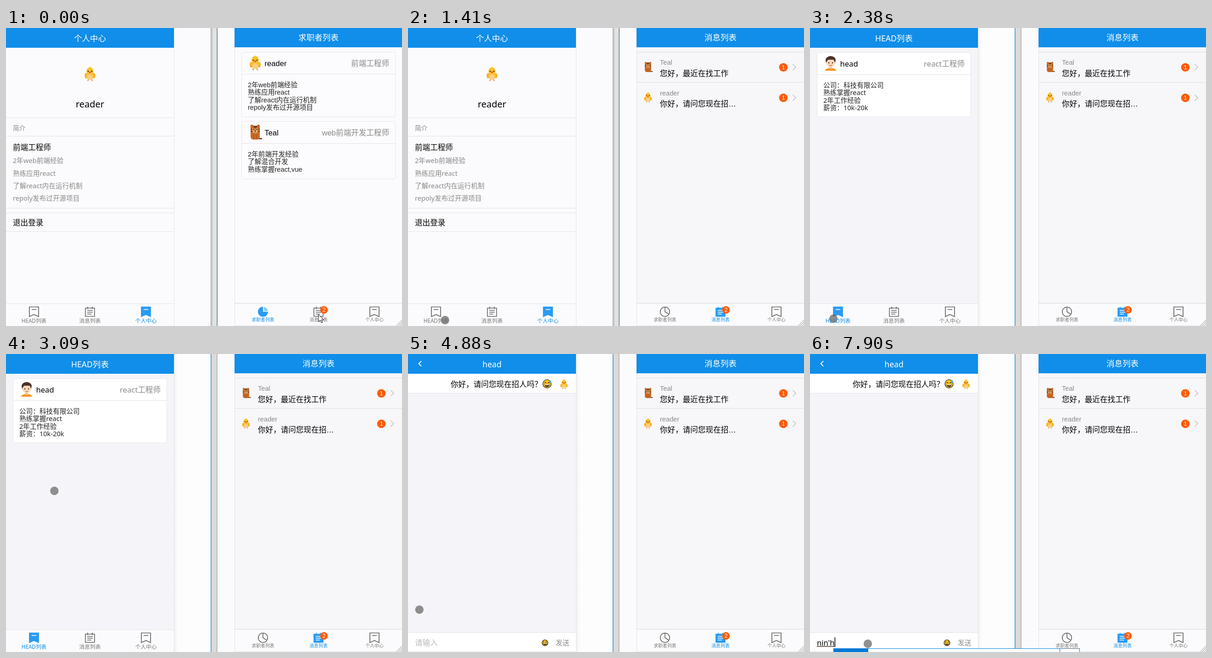
These frames come from a looping animation (863 px wide and 649 px high, 8 s). An HTML page with a canvas:

```html
<!DOCTYPE html>
<html lang="zh-CN">
<head>
<meta charset="utf-8">
<title>消息列表</title>
<style>
html, body { margin: 0; width: 100%; height: 100%; overflow: hidden; }
canvas { display: block; }
</style>
</head>
<body>
<canvas id="stage" width="863" height="649"></canvas>
<script>
const c = document.getElementById('stage').getContext('2d');
const LOOP = 8000;
const BLUE = '#108ee9', ICON_BLUE = '#2a9bf3', GREY = '#888', LINE = '#e2e2e4', PALE = '#fbfbfd';
const CJK = '"Noto Sans CJK SC", "Noto Sans CJK", sans-serif';
const UI = '"Noto Sans", ' + CJK, ARIAL = '"Liberation Sans", ' + CJK;
const SMALL = 11.7, BODY = 14.64, LARGE = 16.6, TITLE = 17.57;

// Cursor path: time, x, y
const PATH = [
  [830, 681, 624], [960, 600, 630], [1080, 470, 628], [1200, 340, 620], [1320, 130, 620],
  [1410, 81, 636], [1520, 49, 634], [1640, 46, 632], [1940, 51, 633], [2810, 51, 633],
  [2900, 53, 580], [3060, 95, 340], [3200, 142, 150], [3290, 151, 112], [4590, 151, 112],
  [4740, 105, 310], [4900, 14, 590], [5000, 50, 632], [5120, 127, 632], [5330, 130, 634],
  [5400, 136, 639], [5470, 126, 631]
];
const PRESSES = [[1940, 2130], [4100, 4340], [5620, 5770]];
// Typed text: time, letters, right edge of the candidate bar, highlight width
const TYPING = [[7260, 'n', 481, 48], [7410, 'ni', 481, 48], [7560, 'nin', 481, 48], [7900, "nin'h", 545, 76]];

function box(color, x, y, w, h) {
  c.fillStyle = color;
  c.fillRect(x, y, w, h);
}

function oval(color, x, y, rx, ry = rx, from = 0, to = Math.PI * 2) {
  c.fillStyle = color;
  c.beginPath();
  c.ellipse(x, y, rx, ry, 0, from, to);
  c.fill();
}

function trace(points, close) {
  c.beginPath();
  points.forEach(([x, y]) => c.lineTo(x, y));
  if (close) c.closePath();
}

function stroke(color, width, points, close) {
  trace(points, close);
  c.strokeStyle = color;
  c.lineWidth = width;
  c.stroke();
}

function fill(color, points) {
  trace(points, true);
  c.fillStyle = color;
  c.fill();
}

function text(str, x, cy, size, color = '#000', font = UI, align = 'left') {
  c.font = size + 'px ' + font;
  c.textAlign = align;
  c.fillStyle = color;
  c.fillText(str, x, cy + size * 0.37);
}

function lines(list, x, y, step, color, font) {
  list.forEach((s, i) => text(s, x, y + i * step, BODY, color, font));
}

// Draws in a 24 x 32 space centred on x, y
function figure(x, y, height, paint) {
  c.save();
  c.translate(x, y);
  c.scale(height / 32, height / 32);
  paint();
  c.restore();
}

function chick() {
  stroke('#e9862c', 1.6, [[-4, 11], [-4, 15], [-6, 15]]);
  stroke('#e9862c', 1.6, [[4, 11], [4, 15], [6, 15]]);
  oval('#f7ab23', -9, 4, 3, 6);
  oval('#f7ab23', 9, 4, 3, 6);
  oval('#fdbf2d', 0, 4, 9, 9);
  oval('#fdbf2d', 0, -6, 8, 8.5);
  stroke('#fdbf2d', 2, [[-2, -15], [0, -12], [2, -16]]);
  oval('#f9cf86', 0, 7, 6, 6);
  oval('#3c2c25', -4, -6, 1.2, 1.6);
  oval('#3c2c25', 4, -6, 1.2, 1.6);
  fill('#e85d2a', [[-3, -4], [0, -6], [3, -4], [0, -1]]);
}

function tiger() {
  stroke('#553423', 2.6, [[3, 14], [15, 14]]);
  oval('#cb6925', -7, -13, 3.5);
  oval('#cb6925', 7, -13, 3.5);
  c.fillStyle = '#cb6925';
  c.beginPath();
  c.roundRect(-10, -14, 20, 30, 6);
  c.fill();
  stroke('#44271d', 1.7, [[-4, -13], [4, -13]]);
  stroke('#44271d', 1.5, [[-3, -10.5], [3, -10.5]]);
  for (const s of [-1, 1]) {
    stroke('#44271d', 1.6, [[s * 10, -7], [s * 6.5, -6]]);
    stroke('#44271d', 1.6, [[s * 10, -2], [s * 7, -2]]);
    oval('#f3bb72', s * 4, -6, 2.6);
    oval('#2b1b17', s * 4, -6, 1.3);
    stroke('#994719', 1, [[s * 3, 5], [s * 3, 14]]);
  }
  oval('#f1c28a', 0, -1, 4.5, 3.2);
  fill('#38231c', [[-2.5, -3.5], [2.5, -3.5], [0, -1]]);
  stroke('#6b341a', 1, [[-2.5, 1], [0, 0], [2.5, 1]]);
}

function boy() {
  oval('#f7941d', 0, 16, 12, 6, Math.PI, Math.PI * 2);
  box('#f1bc98', -3, 5, 6, 7);
  oval('#fbd0ae', -9.5, -2, 2);
  oval('#fbd0ae', 9.5, -2, 2);
  oval('#4b3025', 0, -7, 11, 9);
  oval('#fdd7b8', 0, -1, 9, 9.5);
  fill('#4b3025', [[-10, -3], [-10, -9], [-4, -14], [6, -14], [10, -9], [10, -3], [7, -8], [-5, -8]]);
  oval('#36251f', -4, -1, 1.1, 1.4);
  oval('#36251f', 4, -1, 1.1, 1.4);
  stroke('#b5523f', 1.2, [[-3, 4], [0, 5], [3, 4]]);
}

function smiley(x, y, r, sweat) {
  oval('#2f2710', x, y, r);
  oval('#fcc629', x, y, r - 1.3);
  oval('#3a2514', x, y + r * 0.12, r * 0.58, r * 0.58, 0, Math.PI);
  box('#fff', x - r * 0.45, y + r * 0.15, r * 0.9, r * 0.17);
  for (const s of [-1, 1]) {
    const ex = x + s * r * 0.37, ey = y - r * 0.25;
    if (sweat) stroke('#2f2710', 1.3, [[ex - 2, ey + 1], [ex, ey - 1], [ex + 2, ey + 1]]);
    else oval('#2f2710', ex, ey, r * 0.13, r * 0.22);
  }
  if (sweat) oval('#43b5ee', x + r * 0.7, y - r * 0.5, 2, 3);
}

function bookmark(x, y, active) {
  const shape = [[x - 10, y - 10.5], [x + 10, y - 10.5], [x + 10, y + 10.5], [x, y + 6], [x - 10, y + 10.5]];
  if (active) fill(ICON_BLUE, shape);
  stroke(active ? ICON_BLUE : '#666', 1.7, shape, true);
  stroke(active ? '#fff' : '#666', 1.6, [[x - 5, y - 5], [x + 5, y - 5]]);
}

function calendar(x, y, active) {
  const color = active ? ICON_BLUE : '#666';
  const shape = [[x - 10, y - 8], [x + 10, y - 8], [x + 10, y + 10], [x - 10, y + 10]];
  if (active) fill(color, shape);
  stroke(color, 1.6, shape, true);
  for (const s of [-5, 5]) stroke(color, 1.6, [[x + s, y - 11], [x + s, y - 6]]);
  for (const dy of [-3, 1, 5]) {
    stroke(active ? '#fff' : '#666', 1.5, [[x - 6, y + dy], [x + (dy > 4 ? 3 : 6), y + dy]]);
  }
}

function pie(x, y, active) {
  if (active) {
    oval(ICON_BLUE, x, y, 11);
    box(PALE, x, y - 11, 11, 11);
    c.fillStyle = '#8ccafa';
    c.beginPath();
    c.moveTo(x + 1.5, y - 1.5);
    c.arc(x + 1.5, y - 1.5, 9, -Math.PI / 2, 0);
    c.fill();
    return;
  }
  c.strokeStyle = '#666';
  c.lineWidth = 1.6;
  c.beginPath();
  c.arc(x, y, 10.2, 0, Math.PI * 2);
  c.stroke();
  stroke('#666', 1.6, [[x, y - 10], [x, y], [x + 8, y + 5]]);
}

function badge(n, x, y, r) {
  oval('#ff5b05', x, y, r);
  text(n, x, y - 0.3, 12, '#fff', ARIAL, 'center');
}

function tabs(centers, y, labels, icons, active, size) {
  labels.forEach((label, i) => {
    icons[i](centers[i], 618, i === active);
    text(label, centers[i], y, size, i === active ? BLUE : '#777', UI, 'center');
  });
}

function card(x, y, h, paint, name, job, about, font, bg) {
  c.beginPath();
  c.roundRect(x + 0.5, y + 0.5, 335, h, 3);
  c.fillStyle = bg;
  c.fill();
  c.strokeStyle = '#e6e6e9';
  c.lineWidth = 1;
  c.stroke();
  box(LINE, x + 1, y + 48, 335, 1);
  figure(x + 30, y + 24, 32, paint);
  text(name, x + 50.5, y + 24.5, LARGE, '#000', font);
  text(job, x + 322, y + 24.5, LARGE, GREY, font, 'right');
  lines(about, x + 14, y + 71.5, 16.5, '#222', font);
}

function header(title, x, w, h, cy) {
  box(BLUE, x, 0, w, h);
  text(title, x + 183, cy, TITLE, '#fff', UI, 'center');
}

const SKILLS = ['2年web前端经验', '熟练应用react', '了解react内在运行机制', 'repoly发布过开源项目'];

function profile() {
  header('个人中心', 0, 366, 43, 22);
  figure(183, 100, 31, chick);
  text('reader', 183, 166, 20, '#000', UI, 'center');
  for (const y of [195, 235, 392, 402, 443]) box(LINE, 0, y, 366, 1);
  text('简介', 15, 218, 13.7, GREY);
  text('前端工程师', 15, 260, LARGE);
  lines(SKILLS, 15, 289, 27.2, GREY, UI);
  text('退出登录', 15, 424, LARGE);
}

function jobList() {
  box('#f5f5f9', 0, 43, 366, 558);
  header('HEAD列表', 0, 366, 43, 22);
  card(15, 53, 140, boy, 'head', 'react工程师',
    ['公司：科技有限公司', '熟练掌握react', '2年工作经验', '薪资：10k-20k'], UI, '#fff');
}

function chat(t) {
  box('#f5f5f9', 0, 43, 366, 563);
  header('head', 0, 366, 43, 22);
  stroke('#fff', 1.8, [[29, 15.5], [23.5, 21], [29, 26.5]]);
  box('#fff', 0, 43, 366, 42);
  box(LINE, 0, 85, 366, 1);
  text('你好，请问您现在招人吗？', 93, 65.5, LARGE);
  smiley(303, 65, 9.7, true);
  figure(340, 66, 21, chick);
  box('#fff', 0, 606, 366, 43);
  box(LINE, 0, 606, 366, 1);
  box(LINE, 0, 648, 366, 1);
  smiley(298.5, 629, 7, false);
  text('发送', 322, 628.5, BODY, GREY);
  const typed = TYPING.filter(k => t >= k[0]).pop();
  if (!typed) {
    text('请输入', 15, 628.5, LARGE, '#bbb');
    if (t >= 5770 && t < 6270 || t >= 6740) box('#000', 14, 617, 1.5, 21);
    return;
  }
  text(typed[1], 15, 628.5, LARGE);
  const w = c.measureText(typed[1]).width;
  box('#222', 15, 636, w, 1);
  for (let x = 15; x < 15 + w; x += 3) box('#c33', x, 637, 1.5, 1);
  box('#000', 15 + w, 617, 1.5, 21);
}

function candidates(t) {
  const typed = TYPING.filter(k => t >= k[0]).pop();
  if (!typed) return;
  const [, str, right, mark] = typed;
  c.font = LARGE + 'px ' + UI;
  const left = Math.round(12 + c.measureText(str).width);
  const tail = right === 545 ? 43 : 0;
  box('#fff', left, 641, right + tail - left, 8);
  box('#0078d7', left, 641, right - left, 1);
  box('#0078d7', left, 641, mark, 8);
  box('#0078d7', right - 1, 641, 1, 8);
  if (tail) {
    box('#47617a', right, 641, tail, 1);
    box('#47617a', right + tail - 1, 641, 1, 8);
  }
}

function leftPhone(t) {
  if (t < 2130) profile();
  else if (t < 4340) jobList();
  else return chat(t);
  box(PALE, 0, 601, 366, 48);
  box(LINE, 0, 600, 366, 1);
  tabs([61, 183, 305], 637.5, ['HEAD列表', '消息列表', '个人中心'],
    [bookmark, calendar, bookmark], t < 2130 ? 2 : 0, SMALL);
}

function seekers() {
  header('求职者列表', 498, 365, 42, 20);
  card(513, 52, 141, chick, 'reader', '前端工程师', SKILLS, ARIAL, '#fcfcfe');
  card(513, 203, 125, tiger, 'Teal', 'web前端开发工程师',
    ['2年前端开发经验', '了解混合开发', '熟练掌握react,vue'], ARIAL, '#fcfcfe');
}

function messages() {
  box('#f7f7fa', 499, 42, 364, 558);
  header('消息列表', 498, 365, 42, 20);
  box('#dcdcde', 499, 52, 364, 1);
  box('#dcdcde', 499, 118, 364, 1);
  [[tiger, 'Teal', '您好，最近在找工作'], [chick, 'reader', '你好，请问您现在招…']].forEach(([paint, name, last], i) => {
    const y = 85.5 + i * 66.3;
    figure(523, y - 0.5, 22, paint);
    text(name, 549, y - 10.5, BODY, GREY, ARIAL);
    text(last, 549, y + 13, LARGE, '#000', ARIAL);
    badge('1', 818, y + 0.2, 9.3);
    stroke('#c4c4c6', 1.6, [[838.5, y - 6.5], [845, y], [838.5, y + 6.5]]);
  });
}

function rightPhone(t) {
  const opened = t >= 90;
  opened ? messages() : seekers();
  box(LINE, 498, 42, 1, 607);
  box(PALE, 499, 600, 364, 49);
  box('#d5d5d7', 498, 599, 365, 1);
  tabs([560, 681, 803], 635.5, ['求职者列表', '消息列表', '个人中心'], [pie, calendar, bookmark], opened ? 1 : 0, 9.9);
  badge('2', 693, 614, 8.3);
  box(LINE, 498, 648, 365, 1);
  for (const d of [4, 8, 12]) stroke('#888', 1, [[863 - d, 648], [863, 648 - d]]);
}

function desk(focused) {
  box(PALE, 0, 0, 863, 649);
  if (focused) {
    box('#fdfdfd', 366, 0, 80, 649);
    const shade = c.createLinearGradient(366, 0, 374, 0);
    shade.addColorStop(0, '#f0f0f1');
    shade.addColorStop(1, '#fdfdfd');
    box(shade, 366, 0, 8, 649);
    box('#dadada', 446, 0, 14, 649);
    box('#3f8fc9', 446, 0, 1.5, 649);
    box('#8b8b8b', 459.5, 0, 1, 649);
  } else {
    box('#e2e1e1', 446, 0, 14, 649);
    box('#a2a2a2', 446, 0, 1, 649);
    box('#c9c9c9', 447, 0, 3, 649);
    box('#50818f', 459.5, 0, 1.5, 649);
  }
  box(LINE, 366, 0, 1, 649);
}

function cursorAt(t) {
  const next = PATH.findIndex(p => p[0] > t);
  if (next === 0) return PATH[0].slice(1);
  if (next < 0) return PATH[PATH.length - 1].slice(1);
  const [t0, x0, y0] = PATH[next - 1], [t1, x1, y1] = PATH[next];
  const k = (t - t0) / (t1 - t0);
  return [x0 + (x1 - x0) * k, y0 + (y1 - y0) * k];
}

function cursor(t) {
  const [x, y] = cursorAt(t);
  if (x > 366) {
    const arrow = [[0, 0], [0, 16], [3.7, 12.5], [6.3, 18], [8.8, 17], [6.4, 11.5], [11.5, 11.5]].map(([dx, dy]) => [x + dx, y + dy]);
    fill('#fff', arrow);
    stroke('#000', 1, arrow, true);
    return;
  }
  if (PRESSES.some(([a, b]) => t >= a && t < b)) {
    oval('#333', x, y, 10.5);
    oval('#fff', x, y, 9.6);
    oval('#333', x, y, 8.9);
    oval('#919191', x, y, 8.2);
  } else {
    oval('rgba(105,105,105,.74)', x, y, 9.2);
  }
}

function draw(now) {
  const t = now % LOOP;
  desk(t >= 1940);
  leftPhone(t);
  rightPhone(t);
  candidates(t);
  cursor(t);
  requestAnimationFrame(draw);
}
requestAnimationFrame(draw);
</script>
</body>
</html>
```
